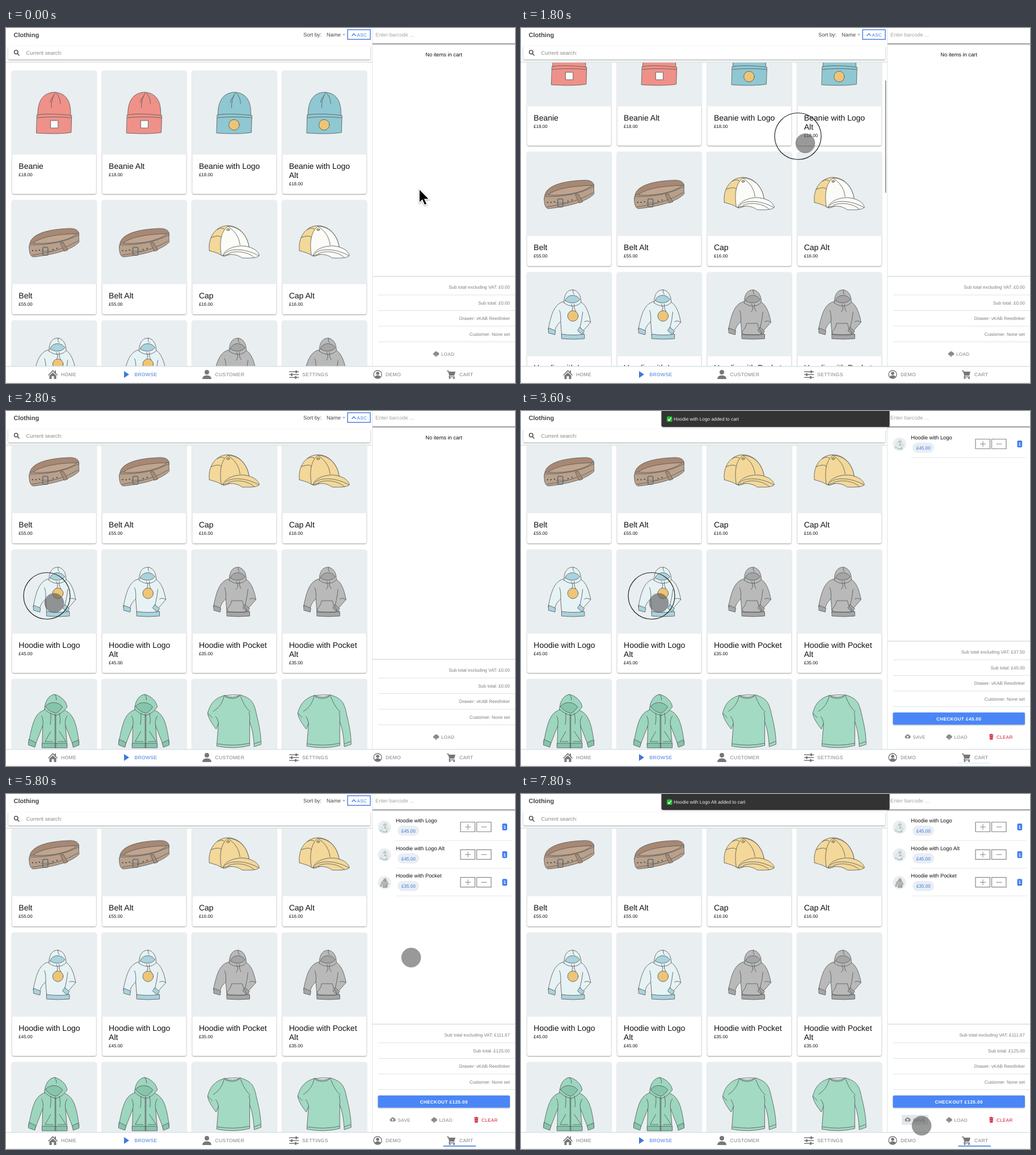
These frames come from a looping animation (897x625 px, 8000 ms). An HTML page:

```html
<!DOCTYPE html>
<html lang="en">
<head>
<meta charset="utf-8">
<title>Shop till</title>
<style>
  html, body { margin: 0; width: 100%; height: 100%; overflow: hidden; background: #fff; }
  svg { display: block; width: 897px; height: 625px; font-family: "Liberation Sans", Arial, sans-serif; text-rendering: geometricPrecision; }
  .art { stroke: #555a5a; stroke-width: .85; stroke-linejoin: round; stroke-linecap: round; fill: none; }
  .a { fill: var(--a); }
  .b { fill: var(--b); }
  .cap { fill: var(--cap); }
  .card { filter: drop-shadow(0 1px 1px #0006); }
  .button { letter-spacing: .4px; }
</style>
</head>
<body>
<svg id="stage" viewBox="0 0 897 625">
  <defs>
    <g id="beanie" class="art">
      <path class="a" d="M46 79C46 56 53 39 76 38C98 40 105 56 104 79Z"/>
      <path class="a" d="M45 78C62 75 90 77 106 79L105 109C86 112 62 111 44 110Z"/>
      <path d="M77 39Q70 48 70 65M75 44Q69 49 68 56M79 40Q86 48 86 58M45 83Q74 80 105 83"/>
    </g>
    <g id="belt" class="art">
      <path fill="#a88873" d="M32 79C32 65 50 52 100 50C115 49 121 55 118 65C108 76 70 84 36 84Z"/>
      <path fill="#c1a48e" d="M40 74C56 64 82 60 117 59C106 71 75 77 40 77Z"/>
      <path fill="#b9a08b" d="M31 82C31 76 35 75 40 76C72 78 105 70 118 57L119 74C107 87 76 96 39 100C33 100 31 92 31 82Z"/>
      <path d="M33 79Q82 80 117 62M36 97Q88 90 117 72"/>
      <path fill="#a88a73" d="M86 75l5-1 8 14-6 2z"/>
      <rect x="55" y="83" width="9" height="14" rx="2" stroke="#606a70" stroke-width="1.6"/>
      <path stroke="#606a70" d="M52 90H73"/>
      <path stroke="#333" stroke-width="2" d="M37 89h.1M43 89h.1M49 88h.1M73 87h.1M80 85h.1"/>
    </g>
    <g id="cap" class="art">
      <path fill="#f3d899" d="M31 89C28 68 40 46 63 45C82 45 98 60 101 84L57 99Q44 92 31 89Z"/>
      <path class="cap" d="M52 97C48 73 52 54 64 46C85 47 98 63 101 83C80 79 62 84 56 98Z"/>
      <path class="cap" d="M55 97C60 83 86 77 102 83C112 86 118 92 119 98C113 103 99 102 89 102C78 94 66 95 55 97Z"/>
      <path d="M58 94C68 84 96 85 118 98M64 94C78 88 99 91 110 101M63 46C76 54 83 64 85 79M45 52Q51 47 57 51M34 66Q50 60 52 66"/>
      <ellipse cx="64" cy="52" rx="2.5" ry="1.8" fill="#e4b963"/>
    </g>
    <g id="hoodie" class="art">
      <path class="a" d="M64 52C47 57 43 78 38 101L49 106C51 98 53 93 60 87L62 112H101L99 104L113 88C110 72 105 57 95 52Z"/>
      <path class="a" d="M66 54C66 38 72 31 82 31C92 33 96 42 96 53C88 62 75 61 66 54Z"/>
      <path class="b" d="M68 50C71 39 87 37 94 48C87 56 75 55 68 50Z"/>
      <path class="b" d="M62 109Q82 112 102 109V117Q82 119 62 117ZM39 98L51 103 50 110 39 107ZM94 97L102 104 97 109 90 103Z"/>
      <path d="M60 87Q61 74 58 67M99 70Q98 82 94 98M113 88Q107 84 102 87M79 56Q84 65 78 70M84 56Q83 64 87 69M82 31Q81 36 84 39"/>
    </g>
    <path id="pocket" class="art" d="M62 105Q69 98 70 90H89Q90 99 97 106L94 110H65Z"/>
    <g id="zipper" class="art">
      <path class="a" d="M62 53C42 58 38 72 30 112L41 118L55 82L54 118H98L95 82L109 118L119 113C114 74 108 58 88 53Z"/>
      <path class="a" d="M58 53C59 38 66 28 76 27C88 30 97 40 98 49C92 57 86 62 78 64Q66 61 58 53Z"/>
      <path class="b" d="M60 48C68 38 83 40 90 49Q84 58 78 60Q65 57 60 48Z"/>
      <path class="b" d="M54 113H98V121H54ZM31 106L43 112 41 120 30 116ZM107 112L118 107 119 116 109 120Z"/>
      <path d="M78 62V121M76.500 62V121M69 60Q70 72 68 80M84 60Q87 72 85 79M69 92L59 110H73M84 92L96 110H82M55 82Q57 72 53 65M95 82Q93 72 98 65M76 27Q80 32 79 37"/>
    </g>
    <g id="shirt" class="art">
      <path class="a" d="M57 29Q73 35 86 28C106 34 110 42 114 62C119 82 122 98 122 115L110 119C109 102 107 88 102 75L102 117Q74 124 44 118L47 78L43 88C35 78 29 68 28 60C32 45 39 34 57 29Z"/>
      <path d="M57 29Q72 27 86 28M59 31Q73 38 84 30M57 30Q53 48 38 57M86 30Q92 48 103 58M102 75Q103 66 101 59M45 114Q74 119 102 113M110 114L121 110M47 78Q46 70 42 66M28 60L36 68"/>
    </g>
    <circle id="logo" class="art" r="9.300" style="fill:#eec577"/>
    <path id="cloud" fill="#8b8b8b" d="M2.800 8a2.700 2.700 0 0 1 0-5.300a3.400 3.400 0 0 1 6-.2a2.800 2.800 0 0 1 0 5.500z"/>
    <g id="cloudUp"><use href="#cloud"/><path fill="#fff" d="M5.700 3l2.200 2.300H6.400V7H5V5.300H3.500z"/></g>
    <g id="cloudDown"><use href="#cloud"/><path fill="#8b8b8b" d="M3.200 8h5l-2.500 2.800z"/></g>
  </defs>
  <g id="grid"></g>
  <rect id="scrollbar" x="641.800" width="1.600" height="198" rx=".8" fill="#858585"/>
  <g id="chrome"></g>
  <g id="cart"></g>
  <g id="tabs"></g>
  <g id="toast">
    <path d="M247.500 0H649.500V25Q649.500 28 646 28H251Q247.500 28 247.500 25Z" fill="#333" style="filter:drop-shadow(0 1px 1px #0005)"/>
    <rect x="257" y="9.500" width="9.500" height="9.500" rx="1.500" fill="#20bd32"/>
    <path d="M259 14.500l2 2.300 3.500-5" fill="none" stroke="#fff" stroke-width="1.400"/>
    <text id="toastText" x="269" y="17" font-size="8.300" fill="#eee"></text>
  </g>
  <g id="pointer">
    <circle id="touch" r="17" fill="#555" fill-opacity=".6" stroke="#555" stroke-opacity=".3"/>
    <circle id="ring" cx="-13" cy="-12.500" r="41" fill="none" stroke="#222" stroke-width="1.200"/>
    <path id="arrow" transform="translate(-13 -13)" d="M0 0V25L5.500 20 9.500 29 14 27 10 18.500H18Z" fill="#000" stroke="#fff" stroke-width="1.600" style="filter:drop-shadow(0 1px 1px #0006)"/>
  </g>
</svg>
<script>
const $ = id => document.getElementById(id);
const BLUE = '#3f78e0', GREY = '#7d7d7d', RED = '#d0112b', PALE = '#e9eef1';

const text = (x, y, size, content, fill = '#111', extra = '') =>
  `<text x="${x}" y="${y}" font-size="${size}" fill="${fill}" ${extra}>${content}</text>`;
const rect = (x, y, w, h, fill, extra = '') =>
  `<rect x="${x}" y="${y}" width="${w}" height="${h}" fill="${fill}" ${extra}/>`;
const use = (id, x = 0, y = 0) => `<use href="#${id}" x="${x}" y="${y}"/>`;
const tint = (a, b, content) => `<g style="--a:${a};--b:${b}">${content}</g>`;

const art = {
  red: tint('#ef9188', '', use('beanie') + rect(69, 88, 13, 13, '#fafafa', 'class="art" style="fill:#fafafa"')),
  blue: tint('#8fc8d2', '', use('beanie') + use('logo', 74.5, 95.5)),
  belt: use('belt'),
  cap: use('cap'),
  logoHoodie: tint('#e7f2f5', '#a9d3dd', use('hoodie') + use('logo', 81.7, 77)),
  greyHoodie: tint('#b9b9b9', '#a5a5a5', use('hoodie') + use('pocket')),
  zipper: tint('#9cd6be', '#86c5ac', use('zipper')),
  shirt: tint('#a3dac4', '', use('shirt')),
};

// Each row: top, height, then its products as [art, title lines, price].
const rows = [
  [75, 217, ['red', 'Beanie', '18'], ['red', 'Beanie Alt', '18'], ['blue', 'Beanie with Logo', '18'], ['blue', 'Beanie with Logo|Alt', '18']],
  [303, 201, ['belt', 'Belt', '55'], ['belt', 'Belt Alt', '55'], ['cap', 'Cap', '16'], ['cap', 'Cap Alt', '16']],
  [515, 217, ['logoHoodie', 'Hoodie with Logo', '45'], ['logoHoodie', 'Hoodie with Logo|Alt', '45'],
    ['greyHoodie', 'Hoodie with Pocket', '35'], ['greyHoodie', 'Hoodie with Pocket|Alt', '35']],
  [743, 217, ['zipper', '', ''], ['zipper', '', ''], ['shirt', '', ''], ['shirt', '', '']],
];

function card([kind, title, price], x, top, height) {
  const lines = title.split('|');
  return `<g transform="translate(${x} ${top})">
    ${rect(1, 0, 148, height, '#fff', 'rx="3" class="card"')}
    <path d="M0 148V4Q0 0 4 0H146Q150 0 150 4V148Z" fill="${PALE}"/>
    ${art[kind]}
    ${lines.map((line, i) => text(12.5, 173 + 16 * i, 14, line)).join('')}
    ${price && text(12.5, 169.5 + 16 * lines.length, 8, `£${price}.00`)}</g>`;
}
$('grid').innerHTML = rows.map(([top, height, ...products]) =>
  products.map((p, i) => card(p, 9.8 + 158.8 * i, top, height)).join('')).join('');

$('chrome').innerHTML =
  rect(0, 0, 646, 60, '#fff') + rect(0, 59.5, 645, 1.5, '#d9e1e3') +
  text(13.5, 16, 11, 'Clothing', '#444', 'font-weight="bold"') +
  text(524, 15, 9.3, 'Sort by:', '#444') + text(565, 15, 9.3, 'Name', '#444') +
  '<path d="M593 10.500h5l-2.500 3z" fill="#aaa"/>' +
  rect(602, 3, 40, 17, '#fff', `stroke="${BLUE}" stroke-width="1.400"`) +
  `<path d="M609.500 14l3.500-4 3.500 4" fill="none" stroke="${BLUE}" stroke-width="1.200"/>` +
  text(618.5, 15, 8, 'ASC', BLUE, 'class="button"') +
  rect(4, 32, 638, 23.5, '#fff', 'rx="2" style="filter:drop-shadow(0 1px 1.200px #0006)"') +
  '<g fill="none" stroke="#555" stroke-width="1.600"><circle cx="17.800" cy="42.500" r="3.200"/><path d="M20 45l3.500 3.500"/></g>' +
  text(35.5, 47, 9.2, 'Current search:', '#888') +
  rect(645, 0, 252, 597, '#fff') + rect(645, 0, 1, 597, '#dfe6e8') +
  text(651, 15, 9.2, 'Enter barcode ...', '#a3a3a3') + rect(646, 27.3, 251, 1.5, '#777c80');

const tabIcons = [
  [74, '<path d="M0 9L8.500 0 12 3.500V1h2v4.500L17 9l-1 1-7.500-7.500L1 10zM2.500 10L8.500 4.500 14.500 10v6h-4v-5h-4v5h-4z"/>'],
  [207, '<path d="M1 2l9 6-9 6z"/>'],
  [346, '<circle cx="8" cy="4" r="4"/><path d="M0 16Q0 9.500 8 9.500T16 16z"/>'],
  [499, '<path d="M0 2.500h17v1.500H0zM0 7.500h17v1.500H0zM0 12.500h17v1.500H0z"/><rect x="11" y="1" width="3" height="4.500"/><rect x="3" y="6" width="3" height="4.500"/><rect x="10" y="11" width="3" height="4.500"/>'],
  [647, '<circle cx="8" cy="8" r="7" fill="none" stroke="#777" stroke-width="1.400"/><circle cx="8" cy="6" r="2.800"/><path d="M3 13q0-3.500 5-3.500t5 3.500q-5 3-10 0z"/>'],
  [777, '<path d="M0 1h3l1 2h11l-2 7H5.500l-.5 1.500h9V13H3l1-3.500L2 2.500H0z"/><circle cx="5" cy="14.500" r="1.500"/><circle cx="12.500" cy="14.500" r="1.500"/>'],
];
const tabLabels = [[97, 'HOME'], [226.5, 'BROWSE'], [368.5, 'CUSTOMER'], [522, 'SETTINGS'], [669, 'DEMO'], [799, 'CART']];
$('tabs').innerHTML = rect(0, 596, 897, 29, '#fff') + rect(0, 595, 897, 1.5, '#d8e2e5') + rect(0, 624, 897, 1, '#eceff0') +
  tabIcons.map(([x, shape], i) => `<g transform="translate(${x} 602)" fill="${i === 1 ? BLUE : '#777'}">${shape}</g>`).join('') +
  tabLabels.map(([x, label], i) => text(x, 613.3, 8.5, label, i === 1 ? BLUE : GREY, 'class="button"')).join('') +
  rect(770.5, 619, 57.5, 1.6, BLUE, 'id="underline"');

const cartItems = [['Hoodie with Logo', 45, 'logoHoodie'], ['Hoodie with Logo Alt', 45, 'logoHoodie'], ['Hoodie with Pocket', 35, 'greyHoodie']];
const netTotals = ['0.00', '37.50', '82.50', '111.67'];

function cartRow([name, price, kind], i) {
  return `<g transform="translate(0 ${48.7 * i})">
    <circle cx="667" cy="58.500" r="11.700" fill="${PALE}"/>
    <g transform="translate(652.500 45) scale(.19)">${art[kind]}</g>
    ${text(687.3, 50, 9.4, name)}
    ${rect(690, 55.5, 38, 18, '#e8eef3', 'rx="9"')}${text(696.7, 68, 8.2, `£${price}.00`, BLUE)}
    <path d="M801 49.500h25.500v17H801zM829.500 49.500H855v17h-25.500z" fill="none" stroke="#858585" stroke-width="1.200"/>
    <path d="M809 58h10M814 53v10M837.500 58h10" stroke="#858585"/>
    ${rect(874.5, 52, 8.7, 12, '#437ff0', 'rx="2"')}${text(878.8, 61, 8, '1', '#fff', 'font-weight="bold" text-anchor="middle"')}
    ${rect(687, 81.5, 204, 1, '#e4e8ea')}</g>`;
}

function cartHtml(count, saveActive) {
  const items = cartItems.slice(0, count);
  const total = items.reduce((sum, item) => sum + item[1], 0).toFixed(2);
  const top = count ? 405 : 437;
  const summary = [`Sub total excluding VAT: £${netTotals[count]}`, `Sub total: £${total}`, 'Drawer: vKAB ReedInker', 'Customer: None set'];
  const action = (x, label, icon) => use(icon, x - 14.8, 568.5) + text(x, 577, 8, label, GREY, 'class="button"');
  const html = rect(646, top - .5, 251, 1.5, '#d9dfe1') + summary.map((line, i) =>
    text(888, top + 22 + 27.5 * i, 8, line, GREY, 'text-anchor="end"') +
    rect(656, top + 32.5 + 27.5 * i, 241, 1, '#dde3e5')).join('');
  if (!count) return html + text(771.5, 50, 9.3, 'No items in cart', '#111', 'text-anchor="middle"') + action(767, 'LOAD', 'cloudDown');
  return html + items.map(cartRow).join('') +
    rect(655.5, 530.7, 232.5, 21.6, '#4a86f7', 'rx="2" style="filter:drop-shadow(0 1px 1px #0004)"') +
    text(771.7, 544.5, 8, `CHECKOUT £${total}`, '#fff', 'font-weight="bold" text-anchor="middle" style="letter-spacing:.5px"') +
    (saveActive ? rect(671, 565, 47, 17.5, '#e1e8ea') : '') +
    action(690.5, 'SAVE', 'cloudUp') + action(763.5, 'LOAD', 'cloudDown') +
    `<path d="M825 569.500h2l.5-1h2.500l.5 1h2v1.300h-7.500zM825.700 571.500h6.200l-.5 7h-5.200z" fill="${RED}"/>` +
    '<path d="M827.500 573v4M830 573v4" stroke="#fff" stroke-width=".7"/>' +
    text(838, 577, 8, 'CLEAR', RED, 'class="button"');
}

// Keyframes: [time, ...values], linear in between.
const scrollKeys = [[1400, 0], [1800, 85], [2000, 190], [2200, 257], [2400, 271]];
const pointerKeys = [[200, 741, 296], [1400, 500, 288], [1800, 501, 203], [2000, 502, 165], [2200, 503, 160],
  [2800, 85, 338], [3000, 85, 338], [3400, 243, 338], [3700, 243, 338], [4200, 421, 331], [4600, 421, 331],
  [5400, 714, 288], [6000, 714, 288], [6800, 706, 584]];
function sample(keys, t) {
  const next = keys.findIndex(key => key[0] > t);
  if (next === 0) return keys[0].slice(1);
  if (next < 0) return keys.at(-1).slice(1);
  const from = keys[next - 1], to = keys[next], k = (t - from[0]) / (to[0] - from[0]);
  return from.slice(1).map((value, i) => value + (to[i + 1] - value) * k);
}
const within = (t, start, end) => t >= start && t < end;
const show = (id, visible) => $(id).setAttribute('visibility', visible ? 'visible' : 'hidden');

let cartState = '';
function draw(t) {
  const [scroll] = sample(scrollKeys, t);
  $('grid').setAttribute('transform', `translate(0 ${-scroll})`);
  $('stage').style.setProperty('--cap', t < 2000 ? '#fbfbf7' : '#f3d899');
  $('scrollbar').setAttribute('y', 62 + scroll * .355);
  show('scrollbar', within(t, 1600, 2800));

  const count = [3000, 3800, 4400].filter(time => t >= time).length, saveActive = t >= 7600;
  if (cartState !== `${count}${saveActive}`) {
    cartState = `${count}${saveActive}`;
    $('cart').innerHTML = cartHtml(count, saveActive);
  }
  $('underline').setAttribute('opacity', t < 3600 ? 0 : t < 3800 ? .15 : 1);

  show('toast', within(t, 3200, 5600) || t >= 6200);
  $('toastText').textContent = `Hoodie with Logo${t < 6000 ? '' : ' Alt'} added to cart`;

  $('pointer').setAttribute('transform', `translate(${sample(pointerKeys, t).join(' ')})`);
  show('arrow', t < 800);
  show('touch', t >= 800);
  show('ring', [[1600, 2000], [2800, 3000], [3600, 3800], [4200, 4400]].some(([start, end]) => within(t, start, end)));
}

// The screen updates five times a second.
function tick() {
  const t = performance.now() % 8000;
  draw(Math.floor(t / 200) * 200);
  requestAnimationFrame(tick);
}
tick();
</script>
</body>
</html>
```
